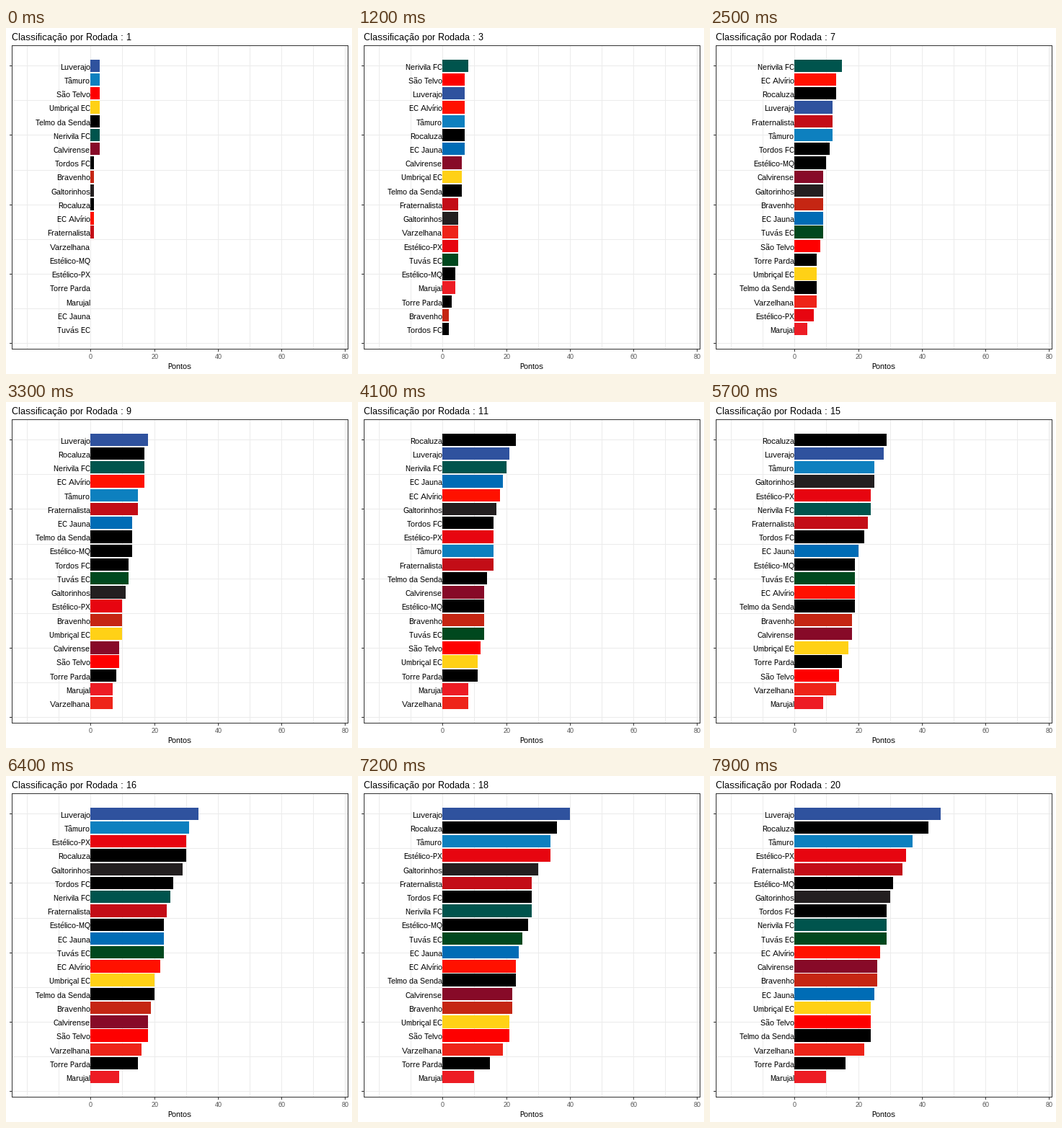
A matplotlib script that plays this animation: 480x480 px, repeating every 8 s.

```python
import matplotlib.pyplot as plt
from matplotlib.animation import FuncAnimation
from matplotlib.patches import Rectangle

SIZE, DPI = 480, 80
plt.rcParams["font.family"] = "Liberation Sans"
plt.rcParams["text.hinting"] = "native"
plt.rcParams["text.hinting_factor"] = 1

# key: (club, bar colour, results by round as Win / Draw / Loss)
CLUBS = {
    "A": ("Luverajo", "#2f529e", "WDLW DDW WWLW WD LWWW WWWW"),
    "B": ("Tâmuro", "#0d80bf", "WLDW DDW LWLD LW WWWW WLWL"),
    "C": ("São Telvo", "#fe0000", "WWDL DLL LDWL LL DDWD LWWL"),
    "D": ("Umbriçal EC", "#ffd116", "WLLW LLD WLDL LL WWLW LDLW"),
    "E": ("Telmo da Senda", "#000000", "WLLW DLL WWDL WD DLLD LWLD"),
    "F": ("Nerivila FC", "#00544d", "WDDW WDW DDLW WL DLDL LWLD"),
    "G": ("Calvirense", "#870a28", "WLWL WLL LLWD LD DWLL DWWD"),
    "H": ("Tordos FC", "#000000", "DLDL WWW DLWD DD DWWD DDDL"),
    "I": ("Bravenho", "#c52613", "DLDL WDW LDWL DW LDLD WLDW"),
    "J": ("Galtorinhos", "#231f20", "DDWL DWL DDWW DW WDDW LDLL"),
    "K": ("Rocaluza", "#000000", "DWWL WWL WDWW DD DWLD WWWW"),
    "L": ("EC Alvírio", "#ff1100", "DWWL WLW DWLD DL LLWL LDDW"),
    "M": ("Fraternalista", "#c30d17", "DWLD DWW WLLD WD WLLD WDWW"),
    "N": ("Varzelhana", "#ee2419", "LWDD DDL LLDL WD DLLW WLWL"),
    "O": ("Estélico-MQ", "#000000", "LWDL LWW WLLL DD WDWD DWDW"),
    "P": ("Estélico-PX", "#e70510", "LDDW LDL DWWW WD DWWW DWLD"),
    "Q": ("Torre Parda", "#000000", "LWLL LWD DLWL DW LLLL LLLD"),
    "R": ("Marujal", "#ed1c24", "LLDW LLL LWLD LD LLLL LDLL"),
    "S": ("EC Jauna", "#006cb5", "LDWW DLD DWWW LL DLWL LDLD"),
    "T": ("Tuvás EC", "#00481e", "LDDW LWD LWLD DW DDDW DDDW"),
}

# Order among clubs level on points; the nearest listed round applies.
TIE_ORDER = {
    1: "ABCDEFGHIJKLMNOPQRST",
    4: "FCALBKSGDEMJNPTORQIH",
    7: "FLKAMBHOGJISTCQDENPR",
    11: "KAFSLJHPBMEGOITCDQRN",
    13: "AKFJPMBLSEHITOQGCNDR",
    17: "ABPKJHFMOSTLDEIGCNQR",
    21: "AKBPMOJHFTLGISDCENQR",
}

ROUND_FRAMES = 4
FRAMES = 80
SHORT_AT = 76          # the round before this frame is one frame shorter

X0, X_STEP = 117.24, 4.4135
Y0, Y_STEP = 52.25, 19.24
LEFT, RIGHT, TOP, BOTTOM = 8, 474, 24, 445
GRID, DARK, GREY = "#ebebeb", "#333333", "#4d4d4d"


def x_at(points):
    return round(X0 + X_STEP * points)


def y_at(row, shift=0.0):
    return round(Y0 + Y_STEP * row + shift)


def points_after(key, rnd):
    results = CLUBS[key][2].replace(" ", "")[:rnd]
    return 3 * results.count("W") + results.count("D")


def standings(rnd):
    nearest = min(TIE_ORDER, key=lambda k: (abs(k - rnd), -k))
    table = [(key, points_after(key, rnd)) for key in TIE_ORDER[nearest]]
    return sorted(table, key=lambda entry: -entry[1])


fig = plt.figure(figsize=(SIZE / DPI, SIZE / DPI), dpi=DPI, facecolor="white")
ax = fig.add_axes([0, 0, 1, 1])
ax.set_xlim(0, SIZE)
ax.set_ylim(SIZE, 0)
ax.axis("off")


def box(x, y, w, h, color, z):
    return ax.add_patch(Rectangle((x, y), w, h, facecolor=color, linewidth=0, zorder=z))


def label(x, y, text, px, color="black", ha="left"):
    return ax.text(x, y, text, fontsize=px * 72 / DPI, color=color,
                   ha=ha, va="baseline", zorder=5)


# Panel: grid, ticks, border
for value in range(-20, 81, 10):
    box(x_at(value), TOP, 1, BOTTOM - TOP, GRID, 1)
for half in range(9):
    y = y_at(2.5 * half)
    box(LEFT, y, RIGHT - LEFT, 1, GRID, 1)
    if half % 2 == 0:
        box(LEFT - 3, y, 3, 1, DARK, 3)
for value in range(0, 81, 20):
    box(x_at(value), BOTTOM, 1, 4, DARK, 3)
    label(x_at(value) + 0.5, 459, str(value), 9, GREY, "center")
for x in (LEFT, RIGHT):
    box(x, TOP, 1, BOTTOM - TOP + 1, DARK, 3)
for y in (TOP, BOTTOM):
    box(LEFT, y, RIGHT - LEFT + 1, 1, DARK, 3)

label(241, 473, "Pontos", 11, ha="center")
title = label(8, 17, "", 13)

bars, names = [], []
for row in range(len(CLUBS)):
    top, bottom = y_at(row, -8.66), y_at(row, 8.66)
    bars.append(box(x_at(0), top, 0, bottom - top, "black", 2))
    names.append(label(x_at(0), y_at(row, 5.3), "", 11, ha="right"))


def draw(frame):
    tick = frame + (frame >= SHORT_AT)
    # The heading follows the bars one frame later.
    heading = 1 + max(tick - 1, 0) // ROUND_FRAMES
    title.set_text(f"Classificação por Rodada : {heading}")
    table = standings(1 + tick // ROUND_FRAMES)
    for (key, points), bar, name in zip(table, bars, names):
        club, color, _ = CLUBS[key]
        bar.set_width(x_at(points) - x_at(0))
        bar.set_facecolor(color)
        name.set_text(club)
    return [title, *bars, *names]


anim = FuncAnimation(fig, draw, frames=FRAMES, interval=100,
                     repeat=True, repeat_delay=0, blit=False)
plt.show()
```
